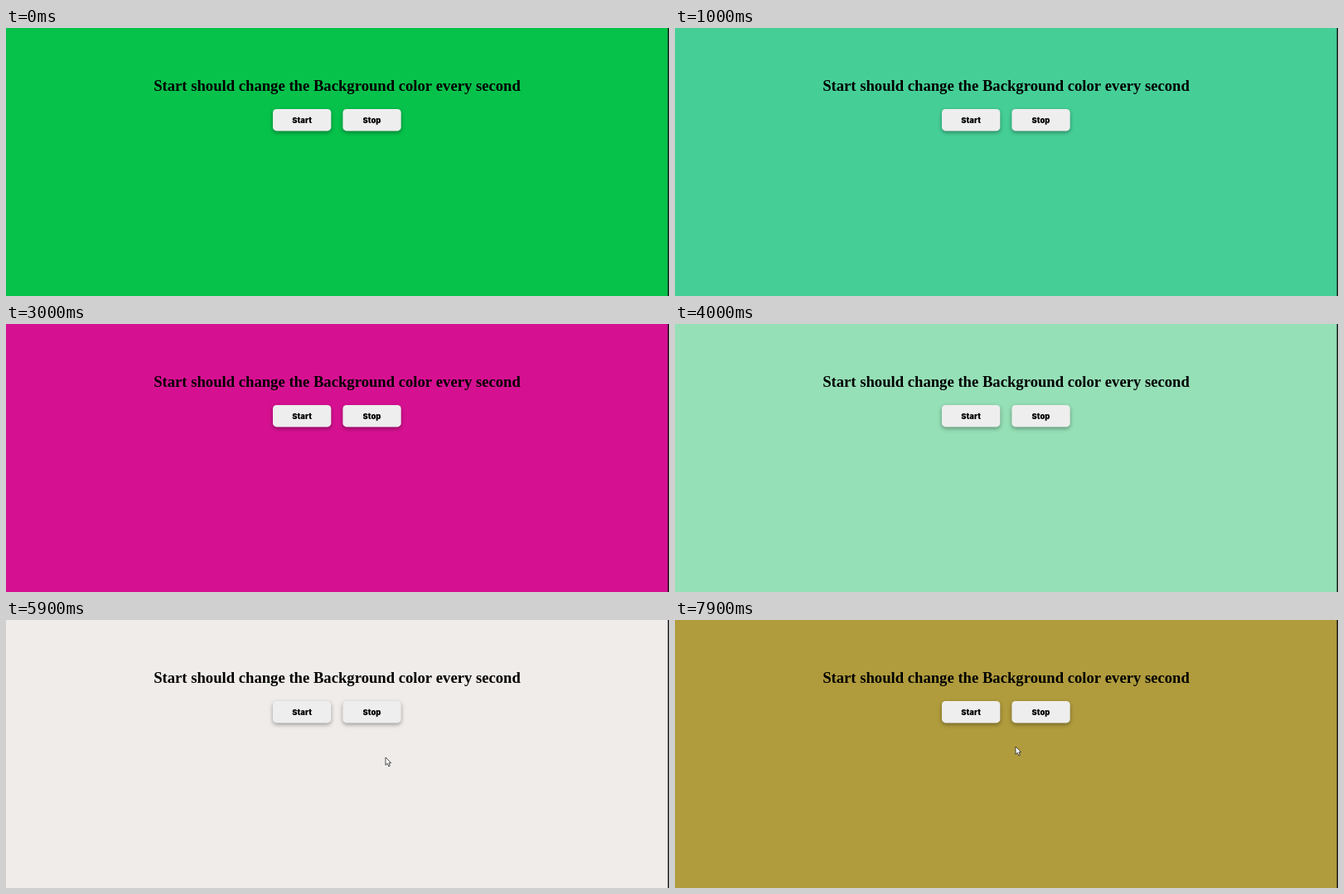
An HTML page with a canvas for the animation above (8 s loop, 800 by 324 pixels).

```html
<!DOCTYPE html>
<html lang="en">
<head>
<meta charset="utf-8">
<title>Background color timer</title>
<style>
  html, body { margin: 0; width: 100%; height: 100%; overflow: hidden; }
  canvas { display: block; width: 800px; height: 324px; }
</style>
</head>
<body>
<canvas id="stage" width="800" height="324"></canvas>
<script>
const ctx = document.getElementById('stage').getContext('2d');
const LOOP = 8000;

// [start time, background]
const colors = [
  [0, '#06c24b'], [100, '#7a9086'], [1000, '#45cf97'], [2000, '#908394'],
  [3000, '#d61191'], [4000, '#95e0b7'], [5000, '#f0ece9'], [6000, '#b09c3d']
];

// [start time, cursor shape, x, y]
const pointer = [
  [0, null], [5800, 'arrow', 474, 216], [5900, 'arrow', 458, 166],
  [6000, 'arrow', 445, 134], [6100, 'hand', 438, 121],
  [6200, 'hand', 434, 118], [6500, 'hand', 431, 118],
  [7700, 'hand', 440, 120], [7800, 'arrow', 432, 137],
  [7900, 'arrow', 411, 153]
];

const shapes = {
  arrow: new Path2D('M0 0V9.4L2.2 7.4L3.8 11L5.4 10.3L3.9 6.8H6.7Z'),
  hand: new Path2D('M-1 1Q0 -0.6 1 1V4.4L2.4 4.6L3.8 5L5.2 5.7V9.5L4 12.6H-0.8L-3.6 8.3Q-3.7 6.7 -2.3 7.2L-1 8.4Z')
};

const at = (steps, t) => steps.findLast(step => step[0] <= t);

function label(text, x, y, font) {
  ctx.font = font;
  ctx.textAlign = 'center';
  ctx.fillStyle = '#000';
  ctx.fillText(text, x, y);
}

function button(text, x) {
  ctx.save();
  ctx.shadowColor = 'rgba(0, 0, 0, 0.36)';
  ctx.shadowBlur = 5;
  ctx.shadowOffsetY = 2;
  ctx.fillStyle = '#eee';
  ctx.beginPath();
  ctx.roundRect(x, 98, 70.3, 26.4, 4.5);
  ctx.fill();
  ctx.restore();
  label(text, x + 35.1, 115, '900 9.4px Inter, "Liberation Sans", sans-serif');
}

function cursor([, shape, x, y]) {
  if (!shape) return;
  ctx.save();
  ctx.translate(x, y);
  ctx.fillStyle = '#fff';
  ctx.strokeStyle = '#222';
  ctx.lineWidth = 0.8;
  ctx.lineJoin = 'round';
  ctx.fill(shapes[shape]);
  ctx.stroke(shapes[shape]);
  ctx.restore();
}

function draw(t) {
  ctx.fillStyle = at(colors, t)[1];
  ctx.fillRect(0, 0, 800, 324);
  ctx.fillStyle = '#111';
  ctx.fillRect(798.6, 0, 1.4, 324);
  label('Start should change the Background color every second', 399.5, 75.6,
    'bold 18.66px "Liberation Serif", "Times New Roman", serif');
  button('Start', 322);
  button('Stop', 406.4);
  cursor(at(pointer, t));
}

const begin = performance.now();
function tick() {
  draw((performance.now() - begin) % LOOP);
  requestAnimationFrame(tick);
}
tick();
</script>
</body>
</html>
```
